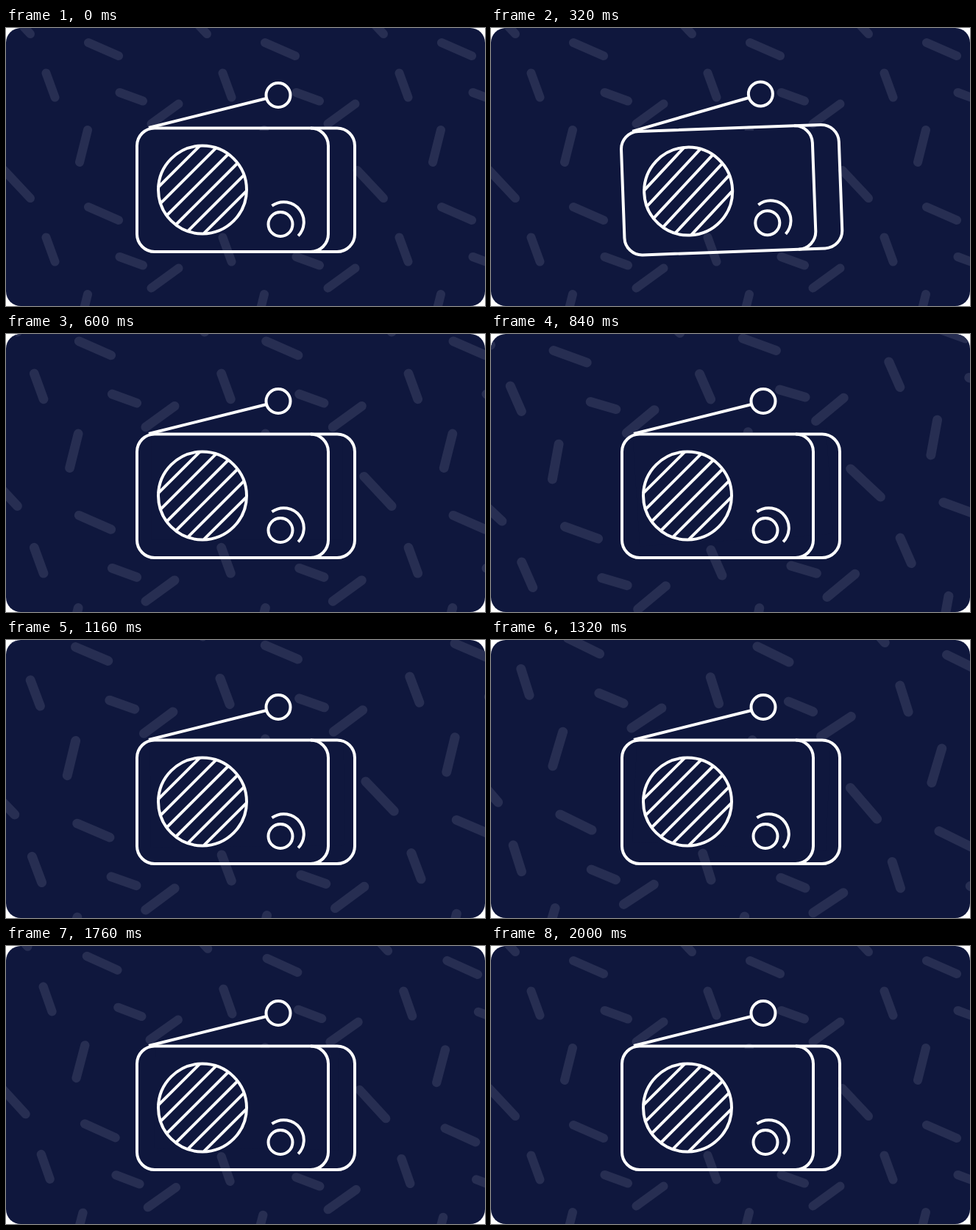
An HTML page for the animation above (2.67 s loop, 651 by 379 pixels).

```html
<!DOCTYPE html>
<html>
<head>
<meta charset="utf-8">
<title>Radio</title>
<style>
  html, body { margin: 0; width: 100%; height: 100%; overflow: hidden; background: #fff; }
  svg { display: block; width: 651px; height: 379px; }
  #confetti, #radio { transform-origin: 325.5px 189.5px; }
</style>
</head>
<body>
<svg viewBox="0 0 651 379" fill="none">
  <defs>
    <clipPath id="card"><rect width="651" height="379" rx="20"/></clipPath>
    <path id="sticks" stroke="#272e52" stroke-width="12" stroke-linecap="round"
      d="M112 20l41 18M54.500 61.500l12 33M197.500 130.500l37 -27M154.500 88l31.500 11.500M111 139l-11 44M-2.500 194l35.500 38"/>
  </defs>
  <g clip-path="url(#card)">
    <rect width="651" height="379" fill="#0f173d"/>
    <g id="confetti"></g>
    <g id="radio" stroke="#fff" stroke-width="4">
      <rect x="178" y="136.500" width="260" height="168.500" rx="24"/>
      <path d="M414 136.500H450a24 24 0 0 1 24 24V281a24 24 0 0 1 -24 24H414"/>
      <path d="M194 136L354 96"/>
      <circle cx="370" cy="91.500" r="16.500"/>
      <circle cx="267" cy="220.500" r="60"/>
      <path id="grille"/>
      <circle cx="373" cy="267.500" r="16.500"/>
      <circle cx="377.500" cy="264.500" r="27.300" pathLength="360"
        stroke-dasharray="170 190" transform="rotate(-126 377.500 264.500)"/>
    </g>
  </g>
</svg>
<script>
const LOOP = 2670, STEP = 40;
const confetti = document.getElementById('confetti');
const radio = document.getElementById('radio');

// Repeat the sticks, then clear the area behind the radio
let tiles = '';
for (let x = 0; x <= 480; x += 240)
  for (let y = -224; y <= 224; y += 224)
    tiles += `<use href="#sticks" x="${x}" y="${y}"/>`;
confetti.innerHTML = tiles + '<rect x="205" y="140" width="245" height="135" fill="#0f173d"/>';

// Diagonal bars ending on the speaker's rim
let bars = '';
for (let off = -31.25; off < 32; off += 12.5) {
  const half = Math.sqrt(60 * 60 / 2 - off * off);
  bars += `M${266.5 + off - half} ${220 + off + half}l${2 * half} ${-2 * half}`;
}
document.getElementById('grille').setAttribute('d', bars);

// Ease in and out from 0 to 1 between two times
function ramp(t, start, end) {
  const x = Math.min(1, Math.max(0, (t - start) / (end - start)));
  return x < 0.5 ? 2 * x * x : 1 - 2 * (1 - x) ** 2;
}

function draw() {
  const t = Math.floor(performance.now() % LOOP / STEP) * STEP;
  const wiggle = t > 200 && t < 600 ? -2.2 * Math.sin((t - 200) / 400 * 2 * Math.PI) : 0;
  const settle = ramp(t, 1350, 2000);
  const zoom = 1 + 0.074 * (ramp(t, 400, 690) - settle);
  const turn = -4.5 * ramp(t, 600, 945) + 7.1 * ramp(t, 945, 1350) - 2.6 * settle;

  radio.style.transform = `rotate(${wiggle}deg)`;
  confetti.style.transform = `rotate(${turn}deg) scale(${zoom})`;
  requestAnimationFrame(draw);
}
draw();
</script>
</body>
</html>
```
